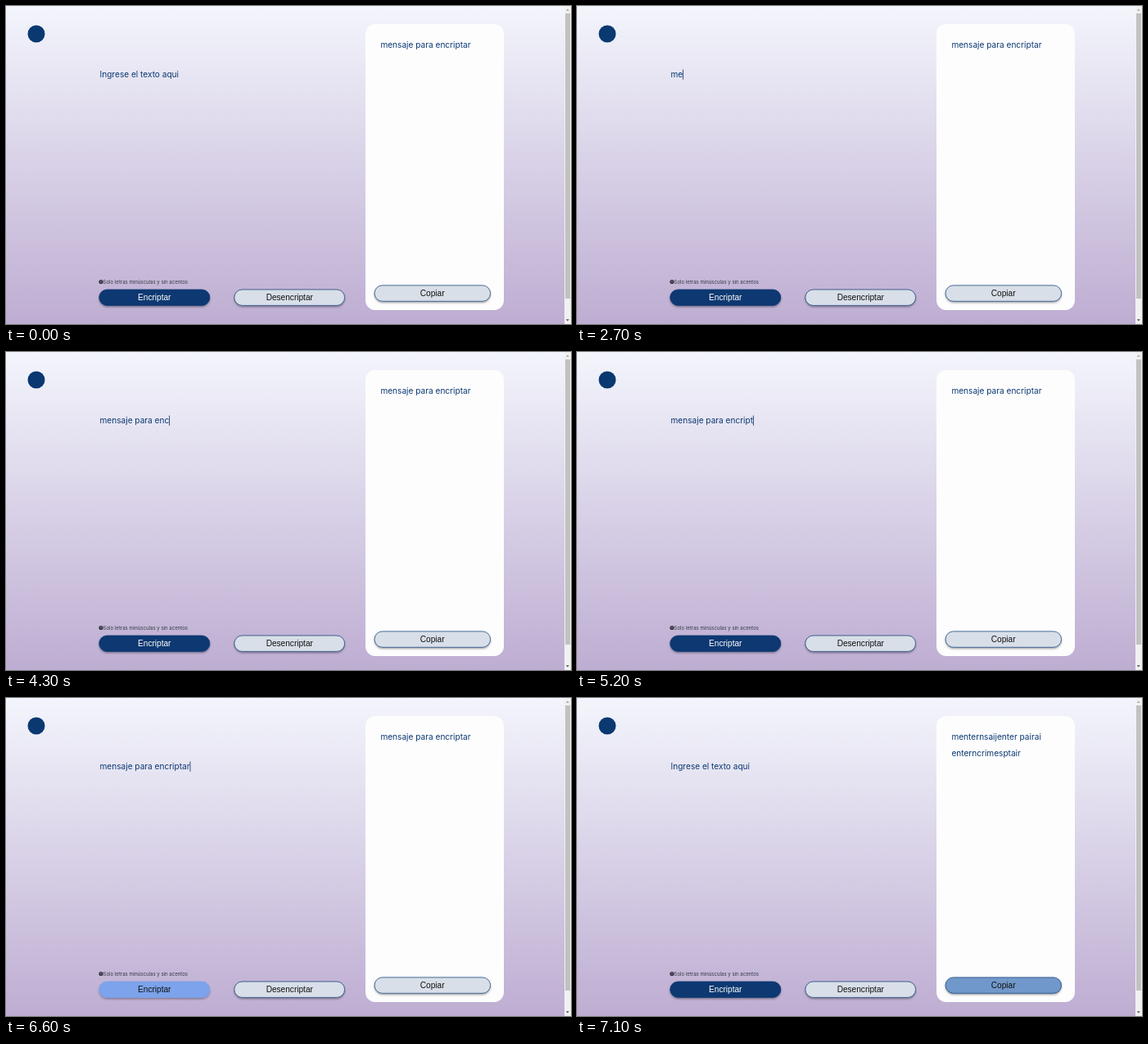
These frames come from a looping animation (690x388 px, 8 s). An HTML page:

```html
<!DOCTYPE html>
<html lang="es">
<head>
<meta charset="utf-8">
<style>
html, body { margin: 0; width: 100%; height: 100%; overflow: hidden; }
svg { display: block; width: 690px; height: 388px; }
text { white-space: pre; }
.msg { font: 400 10.1px Inter, sans-serif; fill: #0a3871; }
.hint { font: 400 6.06px Inter, sans-serif; fill: #343a45; }
.label { font: 400 10.1px "Liberation Sans", Arial, sans-serif; text-anchor: middle; fill: #111; }
.btn rect { stroke: #0a3871; stroke-width: .7; filter: url(#drop); }
</style>
</head>
<body>
<svg viewBox="0 0 690 388">
  <defs>
    <linearGradient id="sky" x1="0" y1="0" x2="0" y2="1">
      <stop offset="0" stop-color="#f3f5fc"/>
      <stop offset="1" stop-color="#beadd2"/>
    </linearGradient>
    <filter id="drop" x="-10%" y="-30%" width="120%" height="180%">
      <feDropShadow dx="0" dy="1.5" stdDeviation="1" flood-color="#000" flood-opacity=".35"/>
    </filter>
  </defs>
  <rect width="690" height="388" fill="url(#sky)"/>
  <circle cx="37" cy="34" r="10.5" fill="#0a3871"/>

  <rect x="439" y="22" width="169" height="349" rx="12" fill="#fdfdfe"/>
  <text class="msg" id="out1" x="457.4" y="50.6"></text>
  <text class="msg" id="out2" x="457.4" y="70.8"></text>

  <text class="msg" id="entry" x="114.5" y="87"></text>
  <rect id="caret" y="77.5" width=".9" height="12.2" fill="#24406f"/>

  <circle cx="116" cy="336.5" r="2.6" fill="#30343d"/>
  <path d="M116 335v1.8M116 337.4v.6" stroke="#d5cbe0" stroke-width=".6"/>
  <text class="hint" x="118.6" y="339">Solo letras minúsculas y sin acentos</text>

  <g class="btn" id="encrypt">
    <rect x="113.7" y="346" width="135.2" height="19.4" rx="9.7"/>
    <text class="label" x="181.3" y="359.3">Encriptar</text>
  </g>
  <g class="btn">
    <rect x="278.8" y="346" width="134.8" height="19.4" rx="9.7" fill="#d8dfe8"/>
    <text class="label" x="346.3" y="359.3">Desencriptar</text>
  </g>
  <g class="btn" id="copy">
    <rect x="450" y="340.9" width="141.6" height="19.4" rx="9.7"/>
    <text class="label" x="520.7" y="354.2">Copiar</text>
  </g>

  <g>
    <rect x="682" width="8" height="388" fill="#f1f1f1"/>
    <rect x="683" y="9" width="6" height="348" fill="#c1c1c1"/>
    <path d="M683.8 5.8h4l-2-2.3z" fill="#a3a3a3"/>
    <path d="M683.8 382.3h4l-2 2.3z" fill="#505050"/>
  </g>
</svg>
<script>
const LOOP = 8000;
const PLAIN = "mensaje para encriptar";
const PROMPT = "Ingrese el texto aqui";
const CIPHER = ["menternsaijenter pairai", "enterncrimesptair"];
const SENT = 6800;

// Key press times in ms, one per letter of PLAIN
const run = (start, count) => Array.from({ length: count }, (_, i) => start + i * 100);
const keys = [...run(2600, 7), 3400, ...run(3600, 8), 4500, 4800, 5000, 5200, 5400, 5500];

const $ = id => document.getElementById(id);
const entry = $("entry"), caret = $("caret");
const within = (t, a, b) => t >= a && t < b;

function setText(node, value) {
  if (node.textContent !== value) node.textContent = value;
}

function setButton(id, fill, ink, edge) {
  const [box, label] = $(id).children;
  box.style.fill = fill;
  box.style.stroke = edge;
  label.style.fill = ink;
}

function draw(t) {
  const sent = t >= SENT;
  const typed = sent ? "" : PLAIN.slice(0, keys.filter(k => k <= t).length);
  setText(entry, typed || PROMPT);
  setText($("out1"), sent ? CIPHER[0] : PLAIN);
  setText($("out2"), sent ? CIPHER[1] : "");

  const lit = within(t, 1900, 2400) || within(t, 2600, 6000) || within(t, 6500, SENT);
  caret.style.display = lit ? "" : "none";
  caret.setAttribute("x", 114.4 + (typed ? entry.getComputedTextLength() : 0));

  if (within(t, 6600, 7000)) setButton("encrypt", "#7ba3eb", "#111", "#7ba3eb");
  else setButton("encrypt", "#0a3871", "#fff", "#0a3871");
  setButton("copy", t >= 7100 ? "#7198ca" : "#d8dfe8", "#111", "#0a3871");
}

const start = performance.now();
function tick() {
  draw((performance.now() - start) % LOOP);
  requestAnimationFrame(tick);
}
tick();
</script>
</body>
</html>
```
